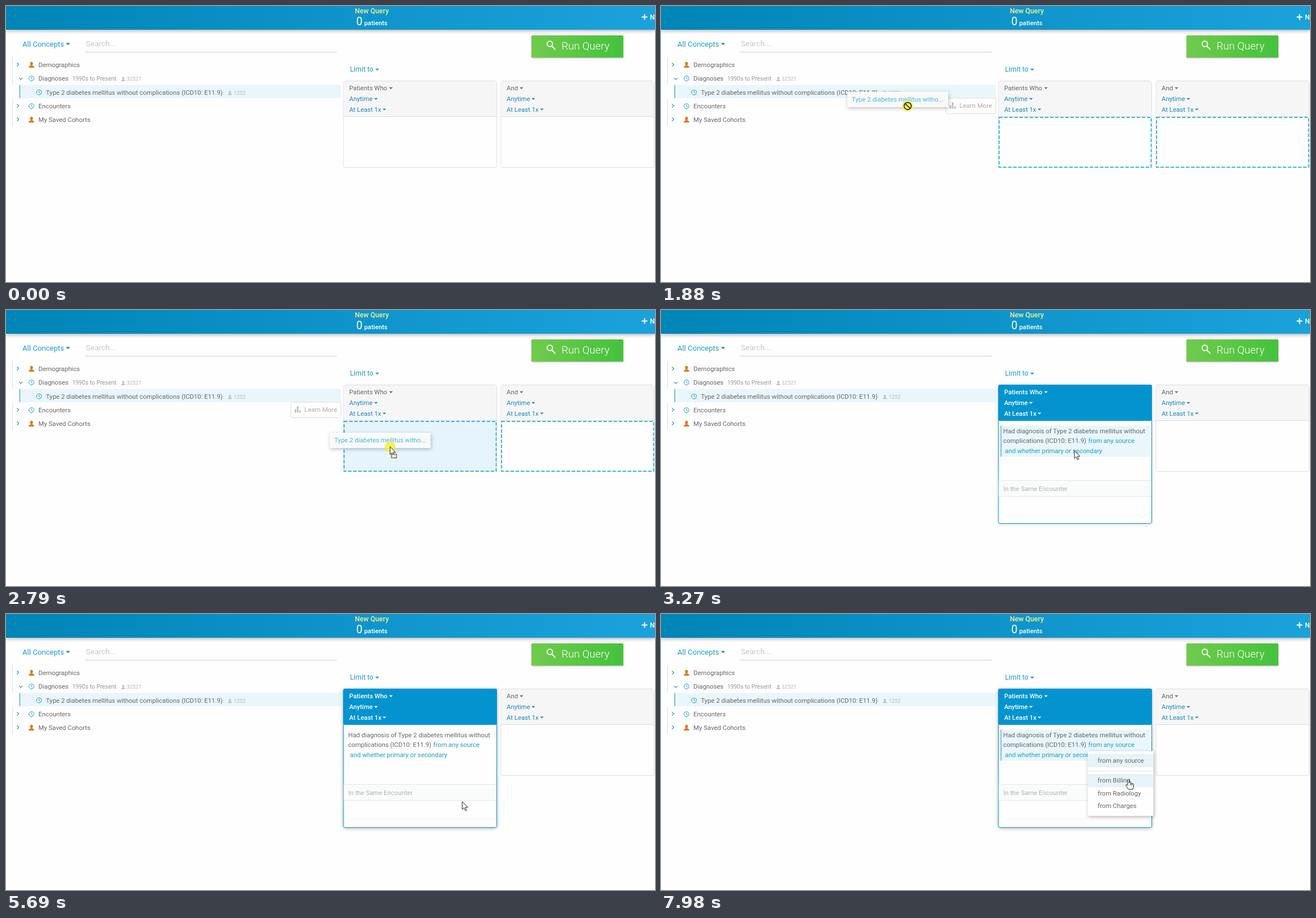
Recreate the animation shown at these times as an HTML page. Size 1146 by 488 pixels, loop 8000 ms.

```html
<!DOCTYPE html>
<html lang="en">
<head>
<meta charset="utf-8">
<title>Query builder</title>
<style>
html, body { margin: 0; width: 100%; height: 100%; overflow: hidden; background: #fefefe; }
svg { display: block; width: 100%; height: 100%; font-family: Roboto, sans-serif; }
.shadow { filter: drop-shadow(1px 2px 3px rgba(0,0,0,.28)); }
.cursor path { stroke-linejoin: round; stroke-linecap: round; }
</style>
</head>
<body>
<svg id="stage" viewBox="0 0 1146 488"></svg>
<script>
const BLUE = '#1c9ad2', LINK = '#1a86bc', GREY = '#666', TINT = '#e9f6fb', ACTIVE = '#0394d0';

// Drawing helpers: each returns markup
const text = (x, y, s, fill = GREY, size = 11.34, weight = 400) =>
  `<text x="${x}" y="${y}" fill="${fill}" font-size="${size}" font-weight="${weight}">${s}</text>`;
const rect = (x, y, w, h, fill, more = '') =>
  `<rect x="${x}" y="${y}" width="${w}" height="${h}" fill="${fill}" ${more}/>`;
const path = (d, stroke, width = 1, fill = 'none') =>
  `<path d="${d}" stroke="${stroke}" stroke-width="${width}" fill="${fill}"/>`;
const group = (id, body, more = '') => `<g id="${id}" ${more}>${body}</g>`;
const caret = (x, y, fill, w = 7) => `<path d="M${x} ${y}h${w}l${-w / 2} ${w / 2}z" fill="${fill}"/>`;
const person = (x, y, fill, k = 1) =>
  `<g transform="translate(${x} ${y}) scale(${k})" fill="${fill}"><ellipse cy="-2.3" rx="2.6" ry="3"/>
  <path d="M-1.5 0h3v1.3l3 1.3v2.6h-9V2.6l3-1.3z"/></g>`;
const clock = (x, y) =>
  `<circle cx="${x}" cy="${y}" r="4.4" stroke="${BLUE}" fill="none"/>` + path(`M${x} ${y - 2.8}v3l2 1`, BLUE);
const chevron = y => path(`M19.5 ${y - 3}l3 3l-3 3`, BLUE, 1.2);

const filters = (x, first, end, colors, weight) =>
  [[first, 145, end], ['Anytime', 164, x + 44], ['At Least 1x', 182.7, x + 59]].map(([s, y, cx], i) =>
    text(x, y + 4, s, colors[i], 11.34, weight) + caret(cx, y - 1.3, colors[i], 6.4)).join('');

const emptyPanel = (x, first, end) =>
  rect(x, 132.5, 270.5, 153, '#fefefe', 'rx="3" stroke="#dedede"') +
  rect(x + .5, 133, 269.5, 62, '#f6f6f6', 'rx="2"') +
  path(`M${x} 195.5h270`, '#dcdcdc') +
  filters(x + 10, first, end, [GREY, LINK, LINK], 400);

const dropZone = (x, id) =>
  rect(x + 1, 197, 268.5, 88, '#fefefe', `id="${id}" stroke="#3fb5e0" stroke-width="2" stroke-dasharray="6 3"`);

const hoverRow = (id, y) => group(id, rect(11, y, 580, 24.2, TINT) + rect(10.5, y, 1.5, 24.2, '#6bbad8'));

const header =
  rect(0, 0, 1146, 42, 'url(#bar)', 'style="filter:drop-shadow(0 2px 3px rgba(0,0,0,.3))"') +
  text(616, 13, 'New Query', '#f6f08c', 12.3, 500) +
  text(618.5, 34, '0', '#fff', 19.5) + text(632.5, 34, 'patients', '#fff', 11.3, 500) +
  path('M1122.5 19.5h10M1127.5 14.5v10', '#fff', 2) + text(1137, 24, 'New', '#fff', 12.3, 500);

const searchBar =
  text(29, 71.5, 'All Concepts', BLUE, 13.1) + caret(105.5, 65.3, BLUE, 8) +
  text(141, 70.5, 'Search...', '#c6c6c6', 13.7) + path('M139 81.5h445', '#ccc') +
  rect(928, 52, 162, 39, 'url(#go)', 'rx="1" style="filter:drop-shadow(0 1px 1px rgba(0,0,0,.35))"') +
  '<circle cx="960.3" cy="67" r="4.8" fill="none" stroke="#fff" stroke-width="1.8"/>' +
  path('M964 71l6 6', '#fff', 2.2) + text(981, 76.5, 'Run Query', '#fff', 18.6, 300) +
  text(607.5, 116, 'Limit to', BLUE, 12.3) + caret(652, 110.8, BLUE);

const tree =
  path('M11.5 91v24M11.5 116v23M11.5 164v23.5M11.5 188.500v23.500', '#cfe6f0') +
  hoverRow('rowEncounters', 164) + hoverRow('rowCohorts', 188.3) +
  rect(25, 139.500, 566.500, 23.500, TINT) + rect(23.500, 139.500, 1.700, 23.500, '#5fb6d8') +
  chevron(103.5) + chevron(176.5) + chevron(200.5) + path('M23 127.300l3 2.700l3-2.700', BLUE, 1.2) +
  person(45, 104, '#d5821c') + person(45, 201, '#d5821c') +
  clock(45, 128.2) + clock(58.3, 152.7) + clock(45, 177) +
  text(57.3, 108, 'Demographics') + text(57.3, 132.3, 'Diagnoses') +
  text(117, 132.300, '1990s to Present', '#999', 10.3) +
  person(207, 129.2, '#c4c4c4', .75) + text(213, 132.3, '32521', '#b8b8b8', 9.3) +
  text(70.5, 156.7, 'Type 2 diabetes mellitus without complications (ICD10: E11.9)') +
  person(395.300, 153.700, '#c4c4c4', .75) + text(402, 156.700, '1252', '#b8b8b8', 9.3) +
  text(57.3, 181, 'Encounters') + text(57.3, 205.2, 'My Saved Cohorts');

const learnMore =
  rect(503, 163, 88.500, 27.500, '#fefefe', 'rx="2" stroke="#dedede"') +
  path('M511 181.500v-6M515 181.500v-11M519.300 181.500v-4', '#bcbcbc', 2.6) +
  text(527, 180, 'Learn More', '#bbb', 11.34, 500);

const activePanel =
  rect(596, 132.500, 270.500, 153, '#fefefe', `id="frame" rx="3" stroke="${ACTIVE}"`) +
  rect(595.500, 132, 271.500, 64, ACTIVE, 'rx="3"') +
  filters(606, 'Patients Who', 676.5, ['#fff', '#fff', '#fff'], 500) +
  '<g clip-path="url(#inside)">' +
  group('rowHover', rect(600, 204.500, 262.500, 55, TINT) + rect(599.500, 204.500, 1.700, 55, '#5fb6d8')) +
  text(604.300, 218.200, 'Had diagnosis of Type 2 diabetes mellitus without') +
  text(604.300, 235.300, 'complications (ICD10: E11.9)') +
  group('linkPlain', text(754.500, 235.300, 'from any source', BLUE)) +
  group('linkHover', rect(753, 223.500, 85, 16.500, '#1ea0da', 'rx="2"') +
    text(754.500, 235.300, 'from any source', '#fff', 11.34, 500)) +
  text(607.600, 253.200, 'and whether primary or secondary', BLUE) +
  rect(596.500, 301.500, 269.500, 28, '#fafcfc') + path('M596.500 301.500h269.500M596.500 329.500h269.500', '#e2e8ea') +
  text(604.500, 319.500, 'In the Same Encounter', '#b0b0b0') + '</g>';

const menu =
  rect(753.500, 242.500, 116, 114.500, '#fefefe', 'class="shadow" rx="1"') +
  rect(754, 247.500, 115.500, 23.500, '#e6f3f8') + path('M754 277.500h115.500', '#e6e6e6') +
  rect(754, 283, 115.500, 22.700, '#e6f3f8', 'id="itemHover"') +
  ['any source', 'Billing', 'Radiology', 'Charges'].map((s, i) =>
    text(771, [263, 298, 320.600, 343.200][i], 'from ' + s)).join('');

const ghost =
  rect(0, 0, 178, 27, '#fefefe', 'class="shadow" fill-opacity=".92"') +
  text(8, 17.200, 'Type 2 diabetes mellitus witho...', '#4db4de');

const arrow = path('M0 0v13.500l3.200-2.900l2.400 5.200l2.200-1l-2.400-5h4z', '#222', 1, '#fff');
const cursors =
  group('halo', '<circle r="9.700" fill="#f4ee3e" fill-opacity=".85"/>') +
  group('arrow', arrow) +
  group('dragArrow', arrow + rect(2.500, 13, 9, 6.500, '#f4e8c8', 'stroke="#444"')) +
  group('denied', '<circle r="6.300" fill="none" stroke="#222" stroke-width="1.700"/>' + path('M-4.300-4.300l8.600 8.600', '#222', 1.7)) +
  group('grab', path('M-4 2L-5.500-3C-5.500-5-3.500-5-3-3.500C-3-6.500-.5-7-.2-5C.5-7 3-6.500 3-4C4-5.500 6-5 6-3V2L4 7.500H-2.500L-6 2C-7 0-5.500-.5-4 2zM-3-3.500l.8 3.500M-.2-5v5M3-4l-.3 4', '#222', 1, '#fff')) +
  group('point', path('M-1.500 9V1.500C-1.500-.5 1.300-.5 1.300 1.500V7C2-.1 4 6 4 7.500C5 6.600 6.500 7 6.500 8.500C7.500 7.500 9 8 9 9.500V13L7.500 18H0L-4.500 11.500C-5.500 9.500-3.500 8.500-1.500 11zM4 7.500v3M6.500 8.500v2.500', '#222', 1, '#fff'));

const defs = `<defs>
  <linearGradient id="bar" gradientUnits="userSpaceOnUse" x1="0" y1="0" x2="1146" y2="60">
    <stop stop-color="#0085b7"/><stop offset="1" stop-color="#1ba2db"/></linearGradient>
  <linearGradient id="go"><stop stop-color="#6fcb4c"/><stop offset="1" stop-color="#45c23d"/></linearGradient>
  <clipPath id="inside"><rect id="clip" x="596" y="196" width="270" height="89"/></clipPath></defs>`;

document.getElementById('stage').innerHTML = defs + header + searchBar + tree +
  group('learn', learnMore) +
  emptyPanel(596, 'Patients Who', 676.5) + emptyPanel(874, 'And', 907) +
  group('zones', dropZone(596, 'zone') + dropZone(874, 'zone2')) +
  group('panel', activePanel) + group('menu', menu) + group('ghost', ghost) +
  group('cursor', cursors, 'class="cursor"');

const el = {};
document.querySelectorAll('[id]').forEach(e => el[e.id] = e);

const LOOP = 8000, PRESS = 1320, DRAG = 1620, DROP = 3080;
const clamp = v => Math.min(1, Math.max(0, v));
const ramp = (t, a, b) => { const p = clamp((t - a) / (b - a)); return p * p * (3 - 2 * p); };

// Cursor stops: time, x, y, eased
const stops = [
  [200, 985, 449, 0], [1000, 371, 156, 1], [1050, 371, 156, 0], [1320, 336, 155, 1],
  [1570, 336, 155, 0], [1630, 355, 157, 0], [2340, 583, 213, 0], [2430, 606, 222, 0],
  [2790, 678, 242, 0], [3060, 730, 249, 0], [3610, 730, 249, 0], [3830, 805, 339, 1],
  [5620, 805, 339, 0], [6070, 814, 234, 1], [7100, 814, 234, 0], [7230, 814, 238, 1],
  [7480, 814, 238, 0], [7970, 825.5, 292, 1]
];
function cursorAt(t) {
  const i = stops.findIndex(s => s[0] > t);
  if (i < 1) return (i < 0 ? stops[stops.length - 1] : stops[0]).slice(1, 3);
  const [t0, x0, y0] = stops[i - 1], [t1, x1, y1, eased] = stops[i];
  const p = eased ? ramp(t, t0, t1) : (t - t0) / (t1 - t0);
  return [x0 + (x1 - x0) * p, y0 + (y1 - y0) * p];
}

const show = (id, on) => el[id].style.display = on ? '' : 'none';
const move = (id, x, y) => el[id].setAttribute('transform', `translate(${x} ${y})`);

function draw(t) {
  const [x, y] = cursorAt(t);
  const dragging = t >= DRAG && t < DROP, dropped = t >= DROP;
  const inTree = t < DRAG && x < 591 && y < 212;
  const overZone = dragging && x > 597 && y > 197;
  const menuOpen = t >= 6520;
  const onLink = t > 5690 && x > 753 && y > 222 && y < 241;
  const inRow = dropped && (menuOpen || y > 204 && y < 260);

  show('rowEncounters', inTree && y > 164 && y < 188);
  show('rowCohorts', inTree && y >= 188);
  show('learn', t > 930 && !dropped);
  show('zones', dragging);
  el.zone.setAttribute('fill', overZone ? '#e6f4fd' : '#fefefe');

  show('panel', dropped);
  const height = 153 + 92 * ramp(t, DROP, 3270);
  el.frame.setAttribute('height', height);
  el.clip.setAttribute('height', height - 64);
  el.panel.style.opacity = clamp((t - DROP + 60) / 160);
  el.panel.style.filter = `drop-shadow(0 1px 3px rgba(0,0,0,${.3 * ramp(t, DROP, 3450)}))`;
  show('rowHover', inRow);
  show('linkHover', onLink);
  show('linkPlain', !onLink);

  show('menu', menuOpen);
  const open = ramp(t, 6480, 6800);
  el.menu.style.opacity = open;
  el.menu.setAttribute('transform', `translate(0 ${242 * .2 * (1 - open)}) scale(1 ${.8 + .2 * open})`);
  show('itemHover', y > 283 && y < 306 && t > 7480);

  show('ghost', dragging);
  move('ghost', x - 106.500, y - 25);

  show('cursor', t >= 230);
  move('cursor', x, y);
  const clicked = t >= 6440 && t < 6720;
  show('halo', t >= PRESS && t < DROP || clicked);
  el.halo.style.opacity = clicked ? 1 - ramp(t, 6540, 6720) : 1;
  const kind = dragging ? (overZone ? 'dragArrow' : 'denied')
    : inTree ? 'grab'
    : onLink || t > 6070 ? 'point' : 'arrow';
  for (const k of ['arrow', 'dragArrow', 'denied', 'grab', 'point']) show(k, k === kind);
}

const start = performance.now();
function tick() {
  draw((performance.now() - start) % LOOP);
  requestAnimationFrame(tick);
}
tick();
</script>
</body>
</html>
```
